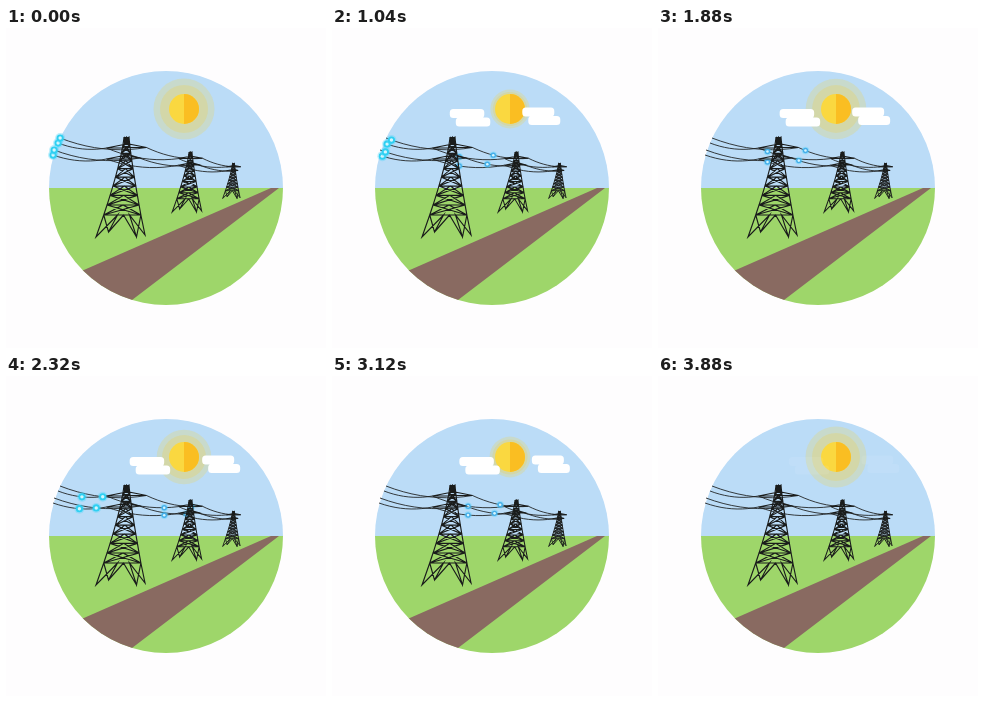
An HTML page with a canvas that plays this animation: 320x320 px, repeating every 3.92 s.

```html
<!DOCTYPE html>
<html>
<head>
<meta charset="utf-8">
<style>
  html, body { margin: 0; width: 100%; height: 100%; overflow: hidden; background: #fefdfe; }
  canvas { display: block; }
</style>
</head>
<body>
<canvas id="stage" width="320" height="320"></canvas>
<script>
const ctx = document.getElementById('stage').getContext('2d');
const LOOP = 3.92, INK = '#1a1c1b', PAPER = '#fefdfe';

function disc(x, y, r, color, from = 0, to = 2 * Math.PI) {
  ctx.fillStyle = color;
  ctx.beginPath();
  ctx.arc(x, y, r, from, to);
  ctx.fill();
}

function polygon(color, ...points) {
  ctx.fillStyle = color;
  ctx.beginPath();
  points.forEach(p => ctx.lineTo(...p));
  ctx.fill();
}

// Flared pylon profile, relative to the apex
const left = y => -2.5 - 28 * (y / 100) ** 1.3;
const right = y => 2.5 + 16 * (y / 100) ** 1.2;
const arms = [[-20, 11], [20, 10.5], [-20, 22], [13, 21]];
const pylons = [
  { x: 120.5, y: 109, scale: 1 },
  { x: 184.5, y: 124, scale: 0.6 },
  { x: 227.5, y: 135, scale: 0.355 },
];

function pylonPath() {
  const path = new Path2D();
  const line = (...pts) => pts.forEach(([x, y], i) => i ? path.lineTo(x, y) : path.moveTo(x, y));
  const LEVELS = 10, BASE = 78;
  for (let i = 0; i < LEVELS; i++) {
    const a = BASE * (i / LEVELS) ** 1.3, b = BASE * ((i + 1) / LEVELS) ** 1.3;
    const mid = (left(a) + right(a)) / 2;
    line([left(a), a], [left(b), b], [right(a), a], [right(b), b], [left(a), a]);
    line([left(b), b], [mid, a], [right(b), b]);
    line([left(b), b], [right(b), b]);
  }
  // Feet and their braces
  line([left(BASE), BASE], [-30.5, 100], [-9, BASE], [-18, 95], [left(BASE), BASE]);
  line([right(BASE), BASE], [18.5, 98], [3, BASE], [10, 100], [right(BASE), BASE]);
  line([-18, 95], [-3, BASE], [10, 100]);
  for (const [x, y] of arms) line([0, y - 4], [x, y], [0, y]);
  return path;
}
const pylonShape = pylonPath();

function drawPylon({ x, y, scale }) {
  ctx.save();
  ctx.translate(x, y);
  ctx.scale(scale, scale);
  ctx.strokeStyle = ctx.fillStyle = INK;
  ctx.lineWidth = 1.15 / scale ** 0.8;
  ctx.stroke(pylonShape);
  ctx.fillRect(-2.5, 0, 5, 8);
  ctx.restore();
}

// Each row holds the four wire ends at one support
const supports = [
  [[52, 115], [54, 110], [47, 127], [48, 122]],
  ...pylons.map(p => arms.map(([x, y]) => [p.x + x * p.scale, p.y + y * p.scale])),
];

function wirePoint(span, wire, u) {
  const [x0, y0] = supports[span][wire], [x1, y1] = supports[span + 1][wire];
  const sag = 0.07 * (x1 - x0) * 4 * u * (1 - u);
  return [x0 + (x1 - x0) * u, y0 + (y1 - y0) * u + sag];
}

function drawWires() {
  ctx.strokeStyle = INK;
  ctx.lineWidth = 0.85;
  ctx.beginPath();
  for (let span = 0; span < 3; span++)
    for (let wire = 0; wire < 4; wire++) {
      ctx.moveTo(...wirePoint(span, wire, 0));
      for (let u = 0.1; u < 1.05; u += 0.1) ctx.lineTo(...wirePoint(span, wire, u));
    }
  ctx.stroke();
}

function drawSparks(age) {
  for (let span = 0; span < 2; span++) {
    const u = (age - 0.8 * span) / 0.65;
    if (u < 0 || u > 1) continue;
    const size = 1 - 0.25 * span;
    for (let wire = 0; wire < 4; wire++) {
      const [x, y] = wirePoint(span, wire, u);
      disc(x, y, 5 * size, 'rgba(90,215,250,.4)');
      disc(x, y, 3.6 * size, span ? '#45aeea' : '#2fd0f2');
      disc(x, y, 1.7 * size, '#d5f6fd');
    }
  }
}

function drawCloud(x, y, w) {
  ctx.fillStyle = '#fff';
  ctx.beginPath();
  ctx.roundRect(x, y, w, 9, 3.5);
  ctx.roundRect(x + 6, y + 8.5, w, 9, 3.5);
  ctx.fill();
}

function drawLand() {
  ctx.save();
  ctx.beginPath();
  ctx.arc(160, 160, 117, 0, 7);
  ctx.clip();
  ctx.fillStyle = '#bbdcf7';
  ctx.fillRect(40, 40, 240, 120);
  ctx.fillStyle = '#9ed66a';
  ctx.fillRect(40, 160, 240, 120);
  polygon('#896a61', [265, 160], [273, 160], [86, 302.5], [32, 262]);
  ctx.restore();
}

function drawSun(t) {
  const pulse = Math.cos(t / LOOP * 4 * Math.PI);
  disc(178, 81, 25 + 5.5 * pulse, 'rgba(240,210,75,.25)');
  disc(178, 81, 20.5 + 3.5 * pulse, 'rgba(240,205,70,.27)');
  disc(178, 81, 15, '#fad840');
  disc(178, 81, 15, '#fabe22', -Math.PI / 2, Math.PI / 2);
}

function draw(t) {
  ctx.fillStyle = PAPER;
  ctx.fillRect(0, 0, 320, 320);
  drawLand();
  drawSun(t);

  ctx.globalAlpha = Math.min(1, t / 0.8, (LOOP - t) / 0.6);
  drawCloud(113 + 4.6 * t, 81, 34.5);
  drawCloud(185.5 + 4.6 * t, 79.5, 32);
  ctx.globalAlpha = 1;

  drawWires();
  for (let start = 0; start < 3; start++) drawSparks(t - start);
  pylons.forEach(drawPylon);
}

function frame() {
  draw(performance.now() / 1000 % LOOP);
  requestAnimationFrame(frame);
}
frame();
</script>
</body>
</html>
```
